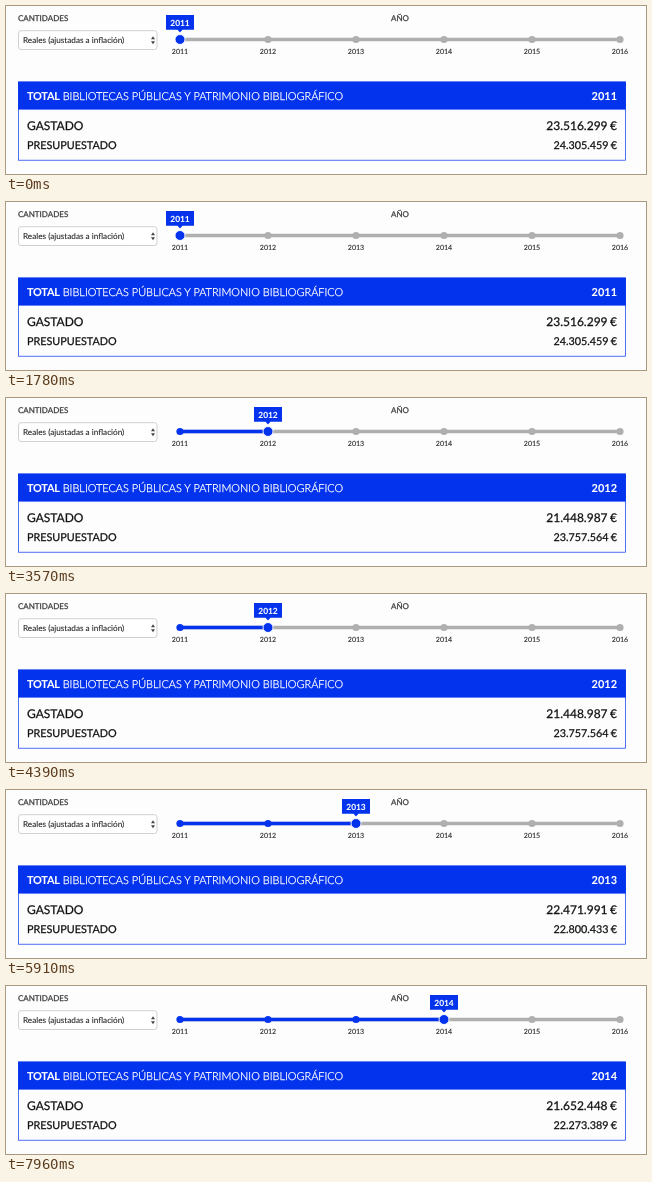
An HTML page for the animation above (8000 ms loop, 640 by 168 pixels).

```html
<!DOCTYPE html>
<html lang="es">
<head>
<meta charset="utf-8">
<style>
  html, body { margin: 0; width: 100%; height: 100%; overflow: hidden; background: #fdfdfe; }
  svg { display: block; width: 640px; height: 168px; font-family: Lato, sans-serif; }
  text { color: #2a2a2a; fill: currentColor; stroke: currentColor; stroke-width: .12px; text-rendering: geometricPrecision; }
  .label { font-size: 8px; stroke-width: .25px; color: #3a3a3a; }
  .year { font-size: 7.1px; text-anchor: middle; }
  .right { text-anchor: end; }
  .head { font-size: 10.95px; font-weight: 300; stroke-width: .3px; }
  .head, .tip text { color: #fff; }
  .bold { font-weight: 700; stroke-width: .1px; }
  .total { letter-spacing: -.25px; }
  .big { font-size: 12px; }
  .mid { font-size: 10.8px; }
  .big, .mid { color: #111; stroke-width: .25px; word-spacing: -.6px; }
  .blue { fill: #0433ee; }
</style>
</head>
<body>
<svg viewBox="0 0 640 168">
  <text class="label" x="12" y="14.5">CANTIDADES</text>
  <text class="label" x="385" y="14.5">AÑO</text>

  <rect x="12.5" y="24.7" width="138.5" height="18.8" rx="2.5" fill="#fff" stroke="#d0d0d3"/>
  <text x="17" y="37" font-size="8.2">Reales (ajustadas a inflación)</text>
  <path d="M145 33.2l2-2.9 2 2.9zM145 35.3l2 2.9 2-2.9z" fill="#444"/>

  <rect x="172" y="31.8" width="444" height="3.4" rx="1.7" fill="#afafb0"/>
  <rect id="track" class="blue" x="172" y="31.8" height="3.4" rx="1.7"/>
  <g id="stops"></g>
  <g id="handle" class="tip">
    <circle class="blue" cy="33.5" r="5" stroke="#fdfdfe"/>
    <path class="blue" d="M-14 9h28v14.8h-11.5l-2.5 2.7-2.5-2.7H-14z"/>
    <text id="tipYear" class="bold" y="19.6" font-size="8.4" text-anchor="middle"></text>
  </g>

  <rect x="12.4" y="76" width="607.2" height="78.2" fill="#fdfdfe" stroke="#0433ee" stroke-width=".7"/>
  <rect class="blue" x="12.1" y="75.6" width="607.8" height="28"/>
  <text class="head" x="21" y="94"><tspan class="bold total">TOTAL</tspan> BIBLIOTECAS PÚBLICAS Y PATRIMONIO BIBLIOGRÁFICO</text>
  <text id="headYear" class="head bold right" x="611" y="94"></text>
  <text class="big" x="21" y="124.3">GASTADO</text>
  <text id="spent" class="big right" x="611" y="124.3"></text>
  <text class="mid" x="21" y="142.6">PRESUPUESTADO</text>
  <text id="budget" class="mid right" x="611" y="142.6"></text>
</svg>
<script>
  const LOOP = 8000, FIRST = 2011, LEFT = 174, STEP = 88;
  const states = [
    { at: 0, year: 2011, spent: '23.516.299', budget: '24.305.459' },
    { at: 3000, year: 2012, spent: '21.448.987', budget: '23.757.564' },
    { at: 4600, year: 2013, spent: '22.471.991', budget: '22.800.433' },
    { at: 7150, year: 2014, spent: '21.652.448', budget: '22.273.389' }
  ];
  const $ = id => document.getElementById(id);
  const xOf = year => LEFT + (year - FIRST) * STEP;

  function add(tag, attrs, text = '') {
    const node = document.createElementNS('http://www.w3.org/2000/svg', tag);
    for (const key in attrs) node.setAttribute(key, attrs[key]);
    node.textContent = text;
    return $('stops').appendChild(node);
  }

  const dots = [];
  for (let year = FIRST; year <= 2016; year++) {
    dots.push(add('circle', { cx: xOf(year), cy: 33.5, r: 3.6 }));
    add('text', { x: xOf(year), y: 48, class: 'year' }, year);
  }

  let shown;
  function show(state) {
    if (state === shown) return;
    shown = state;
    const x = xOf(state.year);
    $('track').setAttribute('width', x - 172);
    $('handle').setAttribute('transform', `translate(${x} 0)`);
    dots.forEach((dot, i) => dot.setAttribute('fill', FIRST + i <= state.year ? '#0433ee' : '#afafb0'));
    $('tipYear').textContent = $('headYear').textContent = state.year;
    $('spent').textContent = state.spent + ' €';
    $('budget').textContent = state.budget + ' €';
  }

  const start = performance.now();
  function frame() {
    const time = (performance.now() - start) % LOOP;
    show(states.filter(state => state.at <= time).pop());
    requestAnimationFrame(frame);
  }
  frame();
</script>
</body>
</html>
```
